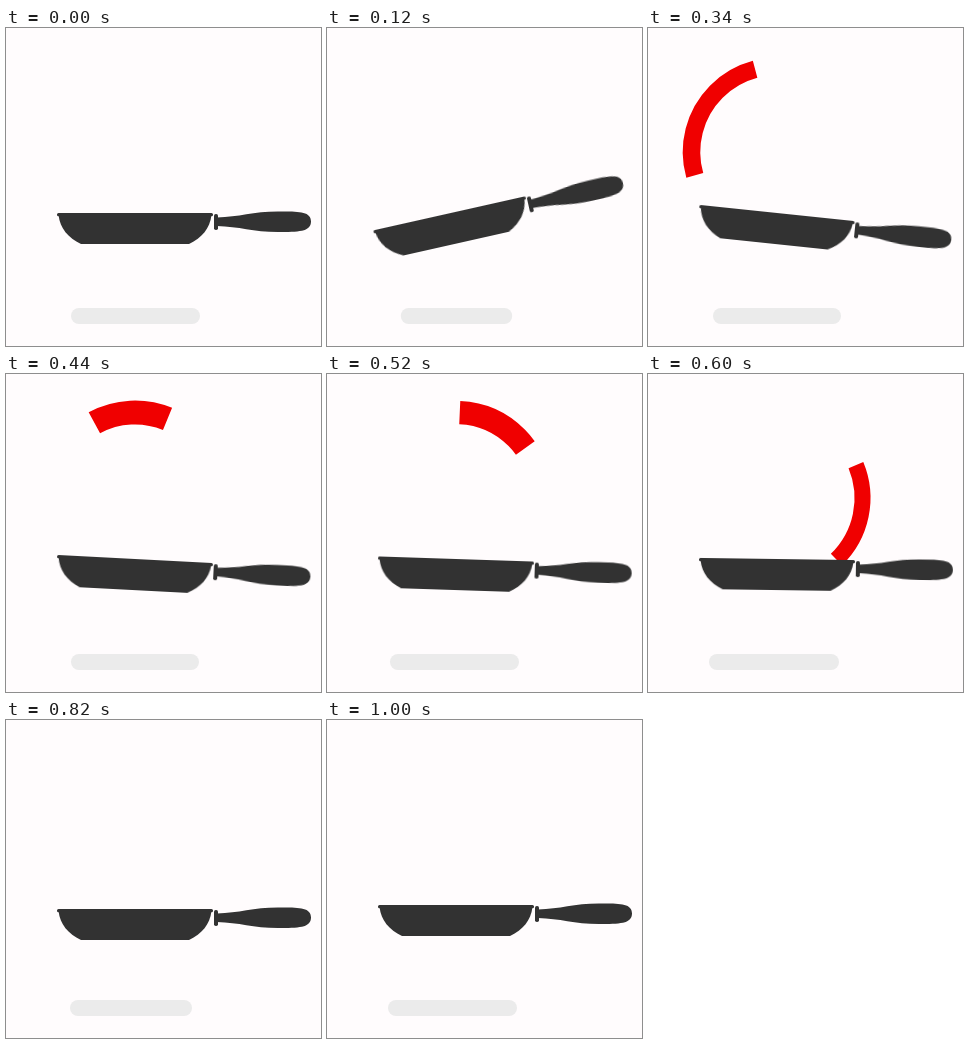
Animation of 315 by 318 pixels, one loop 1.14 s. Source, as an HTML page:

```html
<!DOCTYPE html>
<html lang="en">
<head>
<meta charset="utf-8">
<title>Pan flip loader</title>
<style>
  html, body {
    margin: 0;
    width: 100%;
    height: 100%;
    overflow: hidden;
    background: #fffcfd;
  }

  svg {
    display: block;
    width: 315px;
    height: 318px;
  }

  .pan, .toss, .shadow {
    animation: 1140ms linear infinite;
  }

  .pan {
    fill: #323232;
    transform-origin: 129px 186px;
    animation-name: swing;
  }

  .toss {
    fill: none;
    stroke: #f00000;
    animation-name: toss;
  }

  .shadow {
    fill: #ebebeb;
    animation-name: shadow;
  }

  @keyframes swing {
    0%     { transform: translate(0, 0) rotate(0deg); animation-timing-function: ease-in-out; }
    19.3%  { transform: translate(-11px, .5px) rotate(-21.6deg); animation-timing-function: ease-in-out; }
    29.82% { transform: translate(0, 0) rotate(6deg); }
    38.6%  { transform: translate(0, 0) rotate(3deg); }
    52.63% { transform: translate(0, 0) rotate(.8deg); }
    58.5%  { transform: translate(0, 0) rotate(0deg); animation-timing-function: ease-in-out; }
    71.93% { transform: translate(0, 4px) rotate(0deg); animation-timing-function: ease-in-out; }
    87.72%, 100% { transform: translate(0, 0) rotate(0deg); }
  }

  /* Dash length and offset are degrees along the flight path. */
  @keyframes toss {
    0%, 21.05% { stroke-dasharray: 0 400; stroke-dashoffset: 0; stroke-width: 14px; }
    25.44% { stroke-dasharray: 66 400; stroke-dashoffset: 0; stroke-width: 15.5px; }
    29.82% { stroke-dasharray: 91.5 400; stroke-dashoffset: -29.3; stroke-width: 17.5px; }
    38.6%  { stroke-dasharray: 50.7 400; stroke-dashoffset: -107.3; stroke-width: 24px; }
    43%    { stroke-dasharray: 48 400; stroke-dashoffset: -128; stroke-width: 25px; }
    47.37% { stroke-dasharray: 54 400; stroke-dashoffset: -145; stroke-width: 22px; }
    52.63% { stroke-dasharray: 70 400; stroke-dashoffset: -202.2; stroke-width: 16px; }
    57.9%  { stroke-dasharray: 70 400; stroke-dashoffset: -272; stroke-width: 14px; }
    57.91%, 100% { stroke-dasharray: 0 400; stroke-dashoffset: -272; stroke-width: 14px; }
  }

  @keyframes shadow {
    0%     { x: 65px; width: 129px; animation-timing-function: ease-in-out; }
    19.3%  { x: 80px; width: 99px; animation-timing-function: ease-in-out; }
    29.82% { x: 65px; width: 128px; }
    38.6%  { x: 65px; width: 128px; }
    52.63% { x: 61px; width: 130px; animation-timing-function: ease-in-out; }
    71.93% { x: 64px; width: 122px; animation-timing-function: ease-in-out; }
    87.72%, 99.99% { x: 61px; width: 129px; }
    100%   { x: 65px; width: 129px; }
  }
</style>
</head>
<body>
<svg viewBox="0 0 315 318">
  <rect class="shadow" x="65" y="280" width="129" height="16" rx="8"/>
  <path class="toss" pathLength="272" d="M69.6 185.5A85.5 85.5 0 1 1 188.4 185.5"/>
  <g class="pan">
    <rect x="51" y="185" width="156" height="3.2" rx="1.5"/>
    <path d="M52.5 187C54 200 62 210 75 216H183C196 210 204 200 205.5 187Z"/>
    <rect x="208" y="186" width="4" height="16" rx="1.8"/>
    <path d="M211 189.5C233 189 247 183.5 272 183.5C292 183.5 305 183 305 193.5C305 204 292 204 272 204C247 204 233 198.5 211 198Z"/>
  </g>
</svg>
</body>
</html>
```
